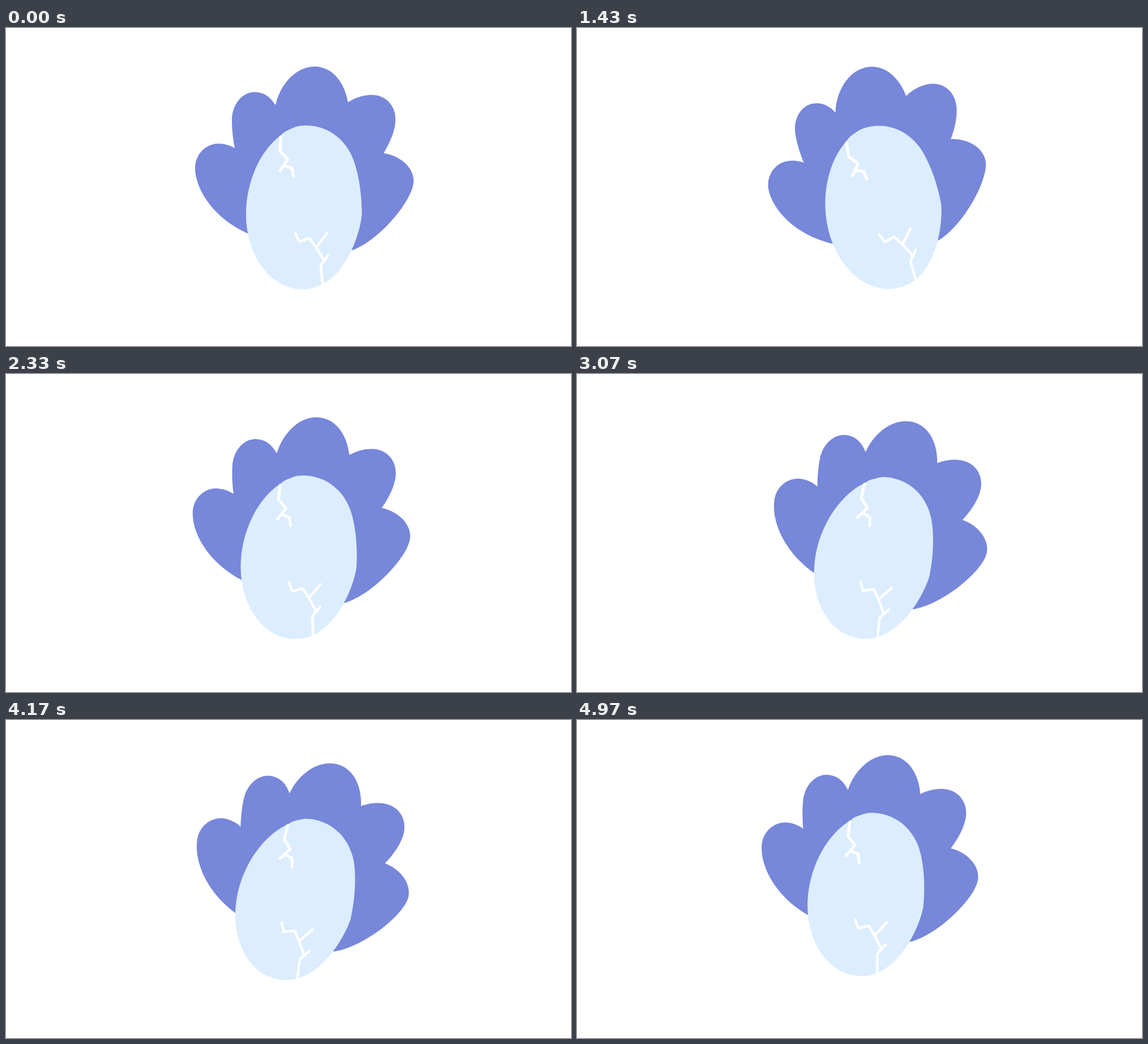
These frames come from a looping animation (998 by 561 pixels, 5.01 s). An HTML page:

```html
<!DOCTYPE html>
<html lang="en">
<head>
<meta charset="utf-8">
<title>Wobbling egg</title>
<style>
  html, body { margin: 0; width: 100%; height: 100%; overflow: hidden; background: #fff; }
  svg { display: block; width: 100%; height: 100%; }
</style>
</head>
<body>
<svg viewBox="0 0 998 561">
  <g id="egg">
    <path fill="#7787da" d="M428 363 C365 335 334 283 334 247 C334 223 353 204 375 204
      C386 204 396 207 404 212 C401 196 399 180 399 163 C399 135 417 113 439 113
      C456 113 467 122 476 136 C484 100 512 68 545 68 C579 68 599 100 604 131
      C615 124 630 118 646 118 C670 118 688 136 688 161 C688 182 677 204 667 221
      C692 224 720 243 720 270 C720 302 661 374 612 392 L520 400 Z"/>
    <path fill="#dcedfe" d="M530 172 C563 172 592 190 608 220 C622 246 629 293 628.5 330
      C624 372 592 461 524 461 C468 461 424 402 424 328 C424 268 452 213 486 189
      C493 181 500 180 505 177 C513 173 521 172 530 172 Z"/>
    <g fill="none" stroke="#fff" stroke-width="5" stroke-linecap="round" stroke-linejoin="round">
      <path d="M485 192 L484 217 L498 232 L484 252 M491 243 L505 247 L508 262"/>
      <path stroke-width="4.5" d="M511 362 L518 377 L536 371 L548 387 L562 410 L556 419 L559 451
        M567 362 L548 387 M569 401 L562 411"/>
    </g>
  </g>
</svg>
<script>
const LOOP = 5010, FPS = 30, LAST = 149;

// Key poses of the wobble: ms, centre x, centre y, degrees
const poses = [
  [0, 528.5, 269.3, 0],
  [270, 521.5, 265, -2],
  [600, 532, 271, -4.5],
  [770, 529.3, 261, -5.9],
  [1085, 521.5, 271, -8.8],
  [1430, 533.5, 270, -11],
  [2330, 522.7, 276.3, 3.4],
  [2720, 539.5, 282, 8],
  [3070, 535.8, 278.5, 11],
  [3750, 531, 265, 12.8],
  [4170, 523.8, 270.8, 12.3],
  [4430, 532, 270, 10.7],
  [4967, 517.8, 261, 5.6]
];
const end = poses.length - 1;

// Smooth cubic through the key poses
function poseAt(t) {
  let i = 0;
  while (i < end - 1 && t >= poses[i + 1][0]) i++;
  const p = poses[i], q = poses[i + 1];
  const span = q[0] - p[0], u = Math.min((t - p[0]) / span, 1), w = 1 - u;
  const slope = (k, part) => {
    const a = poses[Math.max(k - 1, 0)], b = poses[Math.min(k + 1, end)];
    return (b[part] - a[part]) / (b[0] - a[0]);
  };
  return [1, 2, 3].map(part =>
    p[part] * w * w * (1 + 2 * u) + q[part] * u * u * (3 - 2 * u)
    + span * u * w * (slope(i, part) * w - slope(i + 1, part) * u));
}

const egg = document.getElementById("egg");
const start = performance.now();

function draw(now) {
  const ms = Math.max(now - start, 0) % LOOP;
  const step = Math.min(Math.floor((ms + 4) * FPS / 1000), LAST);
  const [x, y, turn] = poseAt(step * 1000 / FPS);
  egg.setAttribute("transform",
    `translate(${x} ${y}) rotate(${turn}) translate(${-poses[0][1]} ${-poses[0][2]})`);
  requestAnimationFrame(draw);
}
draw(start);
</script>
</body>
</html>
```
